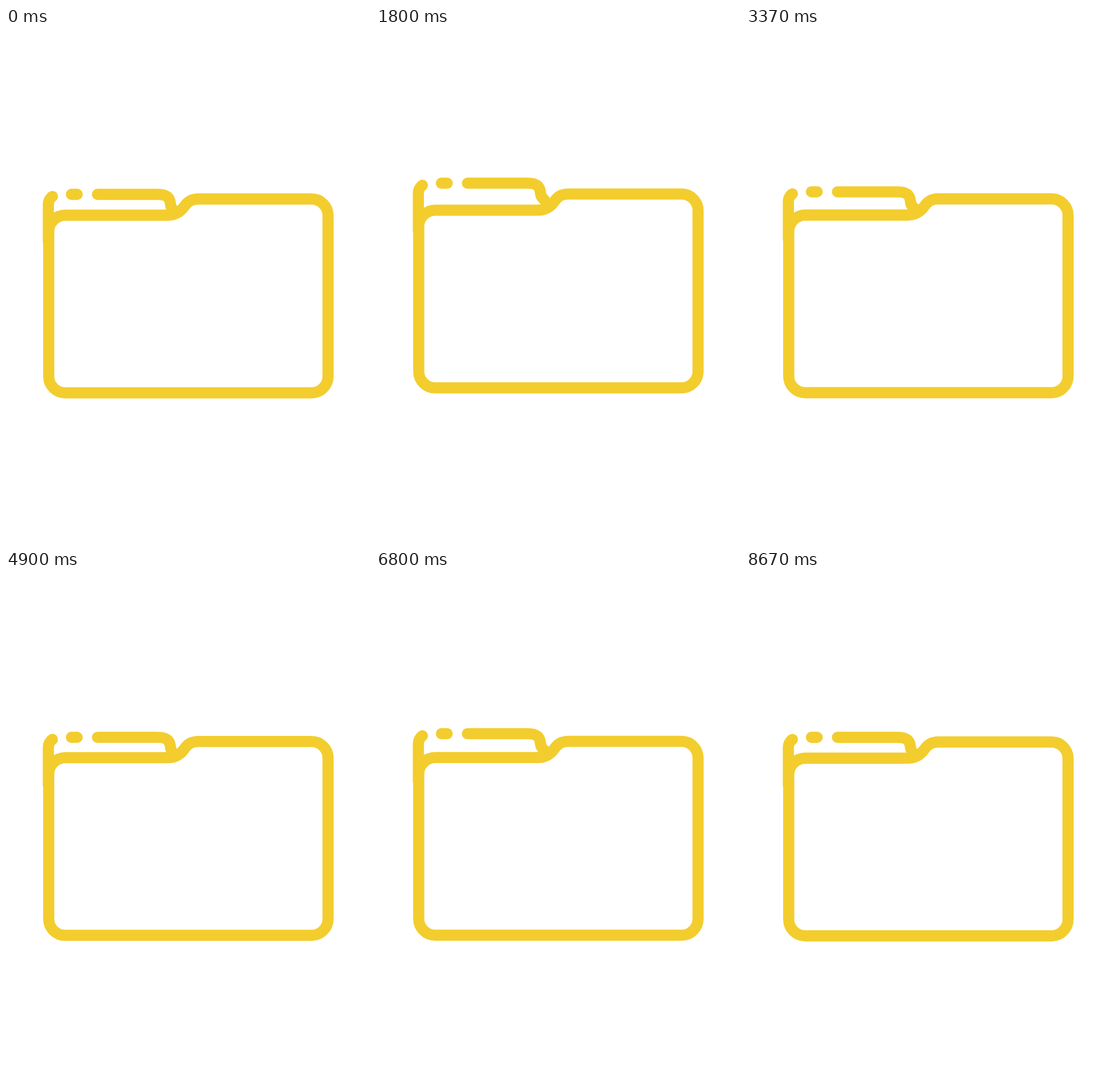
Recreate the animation shown at these times as an HTML page. Size 629 by 890 pixels, loop 9660 ms.

```html
<!DOCTYPE html>
<html lang="en">
<head>
<meta charset="utf-8">
<title>Folder</title>
<style>
  html, body { margin: 0; width: 100%; height: 100%; overflow: hidden; background: #fff; }
  svg { display: block; width: 100%; height: 100%; }
</style>
</head>
<body>
<svg viewBox="0 0 629 890" fill="none" stroke="#f3cd2e" stroke-width="19.3">
  <g id="tab">
    <path d="M73.2 372V304Q73.2 297 80 291"/>
    <circle cx="80.2" cy="291" r="9.6" fill="#f3cd2e" stroke="none"/>
    <path stroke-linecap="round" d="M113 287.5H123M158 287.5H262C279 287.5 283 294 284 303C284.500 311 288 314 291 316"/>
  </g>
  <path id="front" d="M73.800 352A28.700 28.500 0 0 1 102.500 323.500H279C293 323.500 302 317 308 308.500S320 295.500 333 295.500H528A28.500 28.500 0 0 1 556.500 324V602A28.500 28.500 0 0 1 528 630.500H102.500A28.700 28.500 0 0 1 73.800 602Z"/>
</svg>
<script>
  const PERIOD = 4830;
  const FRONT_LEAD = 60;
  const FRONT_RATIO = 0.54;
  // Successive hops: [height, duration in ms]
  const hops = [[15.5, 680], [25, 680], [20, 680], [15.5, 680], [28, 680], [7, 370]];
  const tab = document.getElementById("tab");
  const front = document.getElementById("front");

  function lift(time) {
    if (time <= 0) return 0;
    for (const [height, duration] of hops) {
      if (time < duration) return height * (1 - Math.cos(2 * Math.PI * time / duration)) / 2;
      time -= duration;
    }
    return 0;
  }

  function raise(part, amount) {
    part.setAttribute("transform", `translate(0 ${-amount})`);
  }

  const start = performance.now();
  function draw(now) {
    const time = Math.max(0, now - start) % PERIOD;
    raise(front, FRONT_RATIO * lift(time));
    raise(tab, lift(time - FRONT_LEAD));
    requestAnimationFrame(draw);
  }
  draw(start);
</script>
</body>
</html>
```
